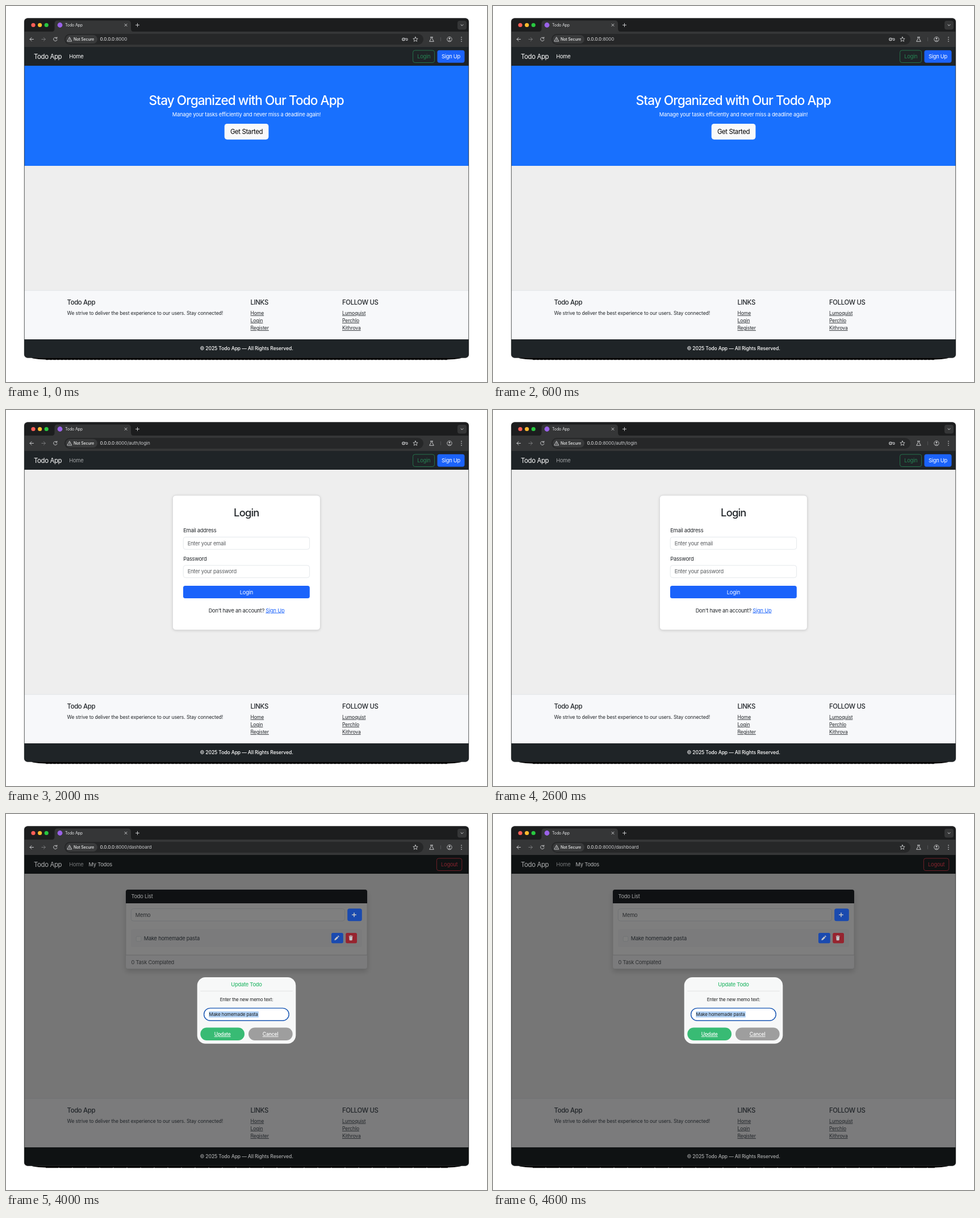
Write an HTML page that moves like this. It is 847x661 px and loops after 5 s.

```html
<!DOCTYPE html>
<html lang="en">
<head>
<meta charset="utf-8">
<title>Todo App</title>
<style>
  html, body { margin: 0; width: 100%; height: 100%; overflow: hidden; background: #fff; }
  svg { display: block; width: 847px; height: 661px; }
  text {
    font-family: Inter, "Liberation Sans", sans-serif;
    font-optical-sizing: none;
    white-space: pre;
  }
  .title { font-size: 22.6px; font-weight: 500; letter-spacing: -.041em; }
  .heading { font-size: 18.3px; font-weight: 500; letter-spacing: -.043em; }
  .large { font-size: 11.4px; letter-spacing: -.032em; }
  .body { font-size: 9.3px; letter-spacing: -.025em; }
  .small { font-size: 8.6px; letter-spacing: -.0135em; }
  .modal { font-size: 8.1px; letter-spacing: -.02em; }
  .url { font-size: 8.1px; letter-spacing: -.01em; }
  .tab { font-size: 7px; letter-spacing: -.02em; }
  .medium { font-weight: 500; }
  .mid { text-anchor: middle; }
  .link { text-decoration: underline; }
  .lift { filter: drop-shadow(0 1px 2px rgba(0, 0, 0, .13)); }
  .float { filter: drop-shadow(0 5px 5px rgba(0, 0, 0, .15)); }
</style>
</head>
<body>
<svg id="stage" viewBox="0 0 847 661"></svg>
<script>
const INK = '#212529', BLUE = '#1b63fb', PALE = '#f7f8fa', LINE = '#dee2e6', HINT = '#595c5f';
const ICON = '#c9cacc';

const rect = (x, y, w, h, fill, r = 0, more = '') =>
  `<rect x="${x}" y="${y}" width="${w}" height="${h}" rx="${r}" fill="${fill}" ${more}/>`;
const text = (x, y, str, cls, fill = INK) =>
  `<text x="${x}" y="${y}" class="${cls}" fill="${fill}">${str}</text>`;
const dot = (x, y, r, fill) => `<circle cx="${x}" cy="${y}" r="${r}" fill="${fill}"/>`;
const line = (d, color = ICON, w = 1) =>
  `<path d="${d}" fill="none" stroke="${color}" stroke-width="${w}" stroke-linecap="round" stroke-linejoin="round"/>`;
const outline = (color, w = 1) => `stroke="${color}" stroke-width="${w}"`;
const field = (x, y, w, hint) =>
  rect(x, y, w, 21.6, '#fff', 4, outline(LINE, .8)) + text(x + 7.5, y + 14.2, hint, 'body', HINT);

function star(cx, cy, r) {
  const points = Array.from({ length: 10 }, (_, i) => {
    const a = i * Math.PI / 5 - Math.PI / 2, k = i % 2 ? r * .45 : r;
    return `${cx + k * Math.cos(a)} ${cy + k * Math.sin(a)}`;
  });
  return line('M' + points.join('L') + 'Z', ICON, .9);
}

function toolbar(path, hasKey) {
  const key = `<circle cx="700" cy="58.5" r="2.3" fill="none" stroke="${ICON}" stroke-width="1.1"/>` +
    dot(700, 58.5, .7, ICON) + line('M702.5 57.2H707V60.3H704.6V59', ICON);
  return rect(32, 21, 784, 25, '#1c1d1e') +
    ['#fe5f57', '#febb2e', '#28c840'].map((c, i) => dot(48 + 11.6 * i, 33.5, 3.6, c)).join('') +
    '<path d="M81 45Q85.500 45 85.500 40V31Q85.500 25.500 91 25.500H214.500Q220 25.500 220 31V40Q220 45 224.500 45Z" fill="#353637"/>' +
    dot(95, 33.5, 4.4, '#9a62e8') +
    text(104, 36.1, 'Todo App', 'tab', '#e3e4e6') +
    line('M209 31.500l4 4m0-4l-4 4', '#d5d6d8', .9) +
    line('M228.500 33.500h6m-3-3v6', '#d5d6d8', .9) +
    rect(795, 26, 16, 15.500, '#353637', 4) +
    line('M801 32.700l2 2 2-2', '#d5d6d8') +
    rect(32, 45, 784, 27.5, '#353637') +
    line('M48.500 58.500H42m3-3l-3 3 3 3') +
    line('M62.800 58.500h6.500m-3-3l3 3-3 3', '#77787a') +
    line('M89.300 56.200A3.200 3.200 0 1 0 90 59.300M89.800 54.800V57H87.500') +
    rect(103, 49, 632, 19, '#262728', 9.5) +
    rect(105, 51, 56, 15, '#393a3b', 7.5) +
    line('M112 55L115.800 62H108.200ZM112 57.500V59.500M112 60.800V60.900', '#e3e4e6', .8) +
    text(119, 61.1, 'Not Secure', 'tab medium', '#eceded') +
    text(165.5, 61.4, `0.0.0.0<tspan fill="#c8c9cb">:8000${path}</tspan>`, 'url', '#f2f2f3') +
    (hasKey ? key : '') +
    star(721, 58.7, 4.4) +
    line('M747.500 54.800h4m-3.200 0v2.800l-2.600 4.700h7.600l-2.600-4.700v-2.800') +
    line('M765.500 55.500v6', '#5a5b5d', .8) +
    '<circle cx="781" cy="58.500" r="4.200" fill="none" stroke="#c9cacc" stroke-width=".9"/>' +
    line('M778.400 61.400Q781 59.400 783.600 61.400', ICON, .9) + dot(781, 57.2, 1.4, ICON) +
    [55, 58.5, 62].map(y => dot(802, y, .85, ICON)).join('');
}

// Flat page areas, which a dialog may shade.
const page = () =>
  rect(32, 72, 784, 33, '#1f2427') +
  rect(32, 105, 784, 395, '#eeeeee') +
  rect(32, 500, 784, 86, PALE) +
  rect(32, 499.7, 784, .8, LINE) +
  rect(32, 586, 784, 33, '#1f2427');

function footer(dim) {
  const list = (x, head, items) => text(x, 525.3, head, 'large medium') +
    items.map((s, i) => text(x, 542.8 + 13.1 * i, s, 'small link')).join('');
  return text(107.5, 525.3, 'Todo App', 'large medium') +
    text(107.5, 542.8, 'We strive to deliver the best experience to our users. Stay connected!', 'small') +
    list(430.5, 'LINKS', ['Home', 'Login', 'Register']) +
    list(592, 'FOLLOW US', ['Lumoquist', 'Perchlo', 'Kithrova']) +
    text(423.5, 605.4, '© 2025 Todo App — All Rights Reserved.', 'small medium mid', dim ? '#a9aaab' : '#fff');
}

function nav({ home, user, dim }) {
  const red = dim ? '#86242e' : '#d83545';
  const brand = text(49, 92.7, 'Todo App', 'large', dim ? '#acadae' : '#fff') +
    text(111.3, 92, 'Home', 'body', home ? '#fff' : dim ? '#76787a' : '#a2a4a6');
  if (user) return brand +
    text(145.6, 92, 'My Todos', 'body', dim ? '#b4b5b6' : '#fff') +
    rect(758.4, 78, 44.4, 21.5, 'none', 3.6, outline(red, .8)) +
    text(780.7, 92, 'Logout', 'body mid', red);
  return brand +
    rect(716.6, 78, 38, 21.5, 'none', 3.6, outline('#278454', .8)) +
    text(735.7, 92, 'Login', 'body mid', '#278454') +
    rect(759.5, 77.7, 48, 22, BLUE, 3.6) +
    text(783.5, 92, 'Sign Up', 'body mid', '#fff');
}

const hero = () =>
  rect(32, 105, 784, 176, '#1870fe') +
  text(423.2, 174, 'Stay Organized with Our Todo App', 'title mid', '#fff') +
  text(423.5, 194, 'Manage your tasks efficiently and never miss a deadline again!', 'body mid', '#fff') +
  rect(384.7, 207, 77.7, 27.7, '#f8f9fa', 4.6) +
  text(423.5, 225, 'Get Started', 'large mid', '#000');

function form(title, top, fields, note, link) {
  const step = 49.75, end = top + step * fields.length;
  return rect(293.4, top, 260, end - top + 137.2, '#fff', 5.5, outline('#d3d4d5', .8) + ' class="lift"') +
    text(423.3, top + 36.7, title, 'heading mid') +
    fields.map(([label, hint], i) =>
      text(312.2, top + 65.3 + step * i, label, 'body') +
      field(312.2, top + 73.4 + step * i, 222.4, hint)).join('') +
    rect(312, end + 59.6, 222.8, 22, BLUE, 3.6) +
    text(423.4, end + 74, title, 'body mid', '#fff') +
    text(423.5, end + 106, `${note} <tspan class="link" fill="${BLUE}">${link}</tspan>`, 'body mid');
}

const board = () =>
  rect(211, 133, 425, 139, '#fdfdfd', 3.6, outline('#cfd0d1', .7) + ' class="float"') +
  '<path d="M211 157V136.500Q211 133 214.500 133H632.500Q636 133 636 136.500V157Z" fill="#1f2226"/>' +
  field(220.3, 166.5, 376.2, '') +
  rect(220, 202.5, 407, 31.5, PALE, 3.6) +
  rect(229.2, 215.2, 8.8, 8.8, '#fff', 2.2, outline(LINE, .8)) +
  '<path d="M211.300 248H635.700V268.500Q635.700 271.700 632.500 271.700H214.500Q211.300 271.700 211.300 268.500Z" fill="#f7f8fa"/>' +
  rect(211, 247.6, 425, .8, '#c8c9cb');

function boardLabels(dim) {
  const blue = dim ? '#1a4aaf' : BLUE, red = dim ? '#96242f' : '#d3303f';
  const white = dim ? '#c4c6c9' : '#fff', grey = dim ? '#2c2e30' : '#55585b';
  return text(220.4, 148.4, 'Todo List', 'body', dim ? '#a4a5a6' : '#fff') +
    text(227.8, 180.7, 'Memo', 'body', grey) +
    text(242.8, 221.9, 'Make homemade pasta', 'body') +
    text(220.4, 263.5, '0 Task Complated', 'body', grey) +
    rect(601.2, 166.3, 25.6, 22, blue, 3.6) +
    line('M609.700 177.300h6.600m-3.300-3.300v6.600', white, 1.5) +
    rect(573, 209, 20.8, 18.2, blue, 2.6) +
    `<path d="M578.300 222l.6-2.500 4.300-4.300 2 2-4.300 4.300zM583.800 214.600l.7-.7q.6-.4 1.200.2l.7.7q.5.600 0 1.100l-.6.700z" fill="${white}"/>` +
    rect(598.2, 209, 19.8, 18.2, red, 2.6) +
    `<path d="M603.800 214.300h2l.5-.7h1.800l.5.700h2v1.100h-6.800zM604.300 216h5.800l-.4 5.400q-.1.800-.9.800h-3.200q-.8 0-.9-.8z" fill="${white}"/>`;
}

const dialog = () =>
  rect(336.7, 287, 173.6, 116.7, '#f7f8f8', 14.5) +
  text(423.5, 302.5, 'Update Todo', 'body medium mid', '#32bb70') +
  rect(342.3, 310.8, 162.5, .8, '#dcdddd') +
  text(423.5, 329, 'Enter the new memo text:', 'modal mid', '#1c1d1e') +
  rect(348.6, 341.4, 149.6, 21.8, '#fff', 10.9, outline('#1957b4', 1.4)) +
  rect(357.2, 347, 87.6, 10.6, '#afd0f4') +
  text(357.5, 355, 'Make homemade pasta', 'modal', '#1c1d1e') +
  rect(342.3, 375.5, 77.7, 22.5, '#38bb74', 11.2) +
  text(381.2, 390, 'Update', 'small medium mid link', '#fff') +
  rect(427, 375.5, 77.7, 22.5, '#9e9e9e', 11.2) +
  text(465.7, 390, 'Cancel', 'small medium mid link', '#fff');

function scene({ path, home, user, dim, back = '', front = '' }) {
  return '<clipPath id="win"><rect x="32" y="21.500" width="783" height="597" rx="6"/></clipPath>' +
    '<path d="M42 616L47 619.500L58 621L75 621.700H772L789 621L800 619.500L806 616Z" fill="#000"/>' +
    `<path d="M70 621.700H778" stroke="#000" stroke-dasharray="${user ? '22 2' : '5 1.500'}"/>` +
    '<g clip-path="url(#win)">' + toolbar(path, !dim) + page() + back +
    (dim ? rect(32, 72, 784, 547, 'rgba(0,0,0,.5)') : '') +
    nav({ home, user, dim }) + footer(dim) + front + '</g>' +
    rect(32.3, 21.8, 782.4, 596.4, 'none', 5.8, outline('#2b2c2e', .8));
}

const email = ['Email address', 'Enter your email'];
const password = ['Password', 'Enter your password'];
const confirm = ['Confirm Password', 'Confirm your password'];
const scenes = [
  scene({ path: '', home: true, back: hero() }),
  scene({ path: '/auth/register',
    back: form('Register', 152.7, [email, password, confirm], 'Do have an account?', 'Login') }),
  scene({ path: '/auth/login',
    back: form('Login', 150, [email, password], "Don't have an account?", 'Sign Up') }),
  scene({ path: '/dashboard', user: true, back: board(), front: boardLabels(false) }),
  scene({ path: '/dashboard', user: true, dim: true, back: board(), front: boardLabels(true) + dialog() })
];

const stage = document.getElementById('stage');
let shown = -1;
function tick() {
  const now = Math.floor(performance.now() % 5000 / 1000);
  if (now !== shown) stage.innerHTML = scenes[shown = now];
  requestAnimationFrame(tick);
}
tick();
</script>
</body>
</html>
```
